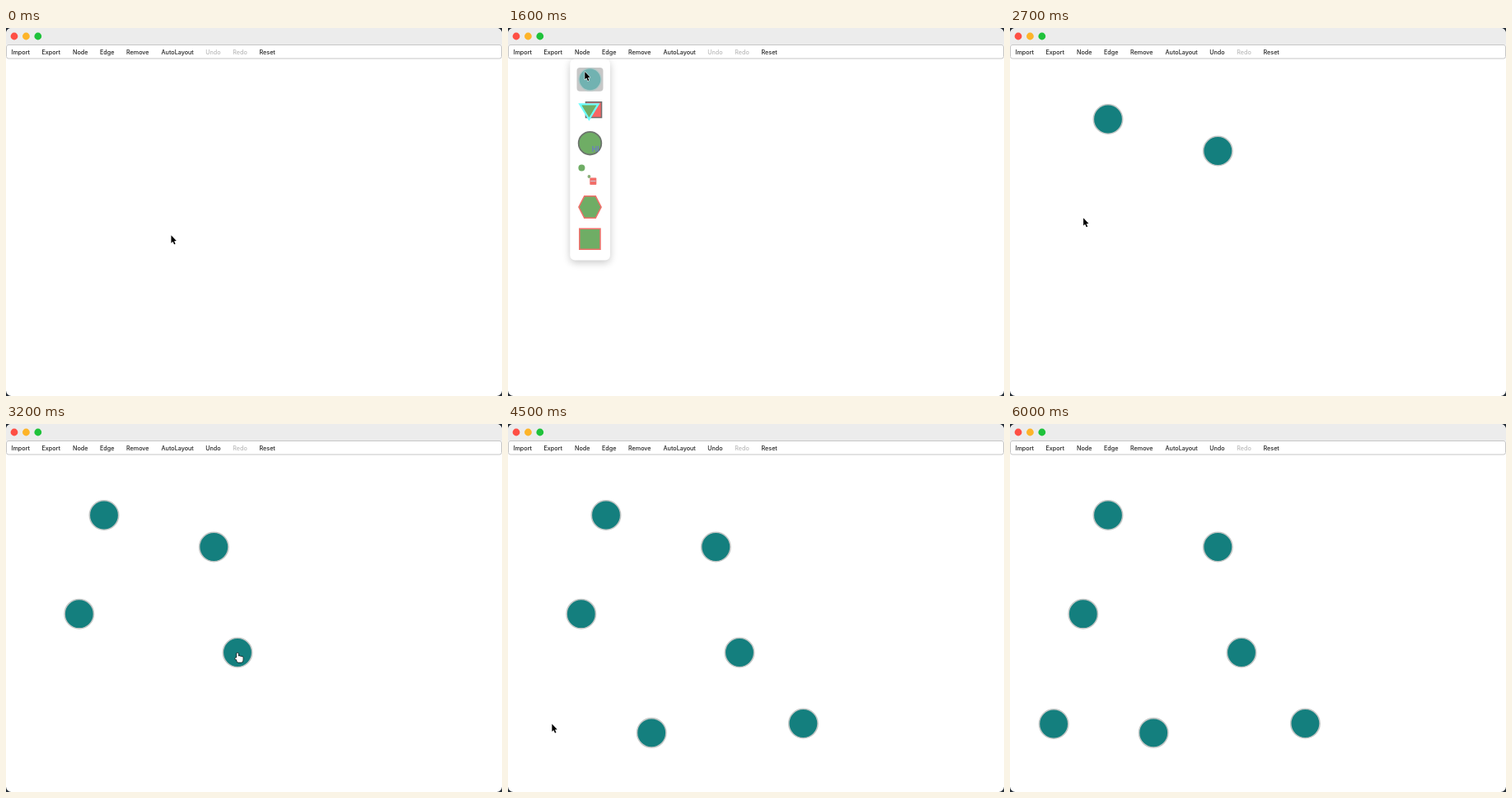
Recreate the animation shown at these times as an HTML page with a canvas. Size 602 by 446 pixels, loop 6700 ms.

```html
<!DOCTYPE html>
<html lang="en">
<head>
<meta charset="utf-8">
<title>Graph editor</title>
<style>
  html, body { margin: 0; width: 100%; height: 100%; overflow: hidden; background: #fff; }
  canvas { display: block; width: 602px; height: 446px; }
</style>
</head>
<body>
<canvas id="stage"></canvas>
<script>
const W = 602, H = 446, LOOP = 6700, TICK = 100, TRAVEL = 300;
const MENU_OPEN = 700, MENU_CLICK = 1600, POINTER_GONE = 6000;
const TEAL = '#147f7e', GREEN = '#107800', RED = '#e81008';
const dpr = window.devicePixelRatio || 1;

function setup(canvas) {
  canvas.width = W * dpr;
  canvas.height = H * dpr;
  const c = canvas.getContext('2d');
  c.scale(dpr, dpr);
  return c;
}
const ctx = setup(document.getElementById('stage'));
const layer = document.createElement('canvas');
const menu = setup(layer);

const labels = {
  Import: 6.5, Export: 43.5, Node: 81, Edge: 114, Remove: 146,
  AutoLayout: 188.5, Undo: 242.2, Redo: 275.2, Reset: 307.5
};

// The pointer visits each stop; a stop with `node` leaves a node there after the wait.
const stop = (x, y, arrive, wait = 0, bow = 0) => ({ x, y, arrive, leave: arrive + wait, bow });
const place = (...args) => ({ ...stop(...args), node: true });
const stops = [
  stop(200.2, 251.3, 0),
  stop(113, 157, 100, 200),
  stop(89.5, 29.8, 600, 300),
  stop(95, 252, 1100),
  stop(93, 53, 1200, 400),
  place(119, 110.5, 1800, 200),
  place(252.3, 149, 2200, 200),
  place(88.8, 230.2, 2700, 100, -68),
  place(281, 277, 3000, 200),
  place(174.2, 374.3, 3500, 200),
  place(358.4, 363, 4000),
  place(53.1, 363.5, 4500, 200),
  stop(88, 380, 4800),
  stop(51, 366, 4900),
  stop(138, 70, 5300),
  stop(340, 9, 5700)
];
const nodes = stops.filter(s => s.node);

function pointerAt(t) {
  const i = stops.findLastIndex((s, n) => n === 0 || t >= stops[n - 1].leave);
  const to = stops[i], from = stops[Math.max(0, i - 1)];
  const start = Math.max(from.leave, to.arrive - TRAVEL);
  const k = Math.min(1, Math.max(0, (t - start) / (to.arrive - start || 1)));
  const e = k * (2 - k);
  return [
    from.x + (to.x - from.x) * e,
    from.y + (to.y - from.y) * e + to.bow * 4 * e * (1 - e)
  ];
}

function paint(c, fill, stroke, width) {
  if (fill) { c.fillStyle = fill; c.fill(); }
  if (stroke) { c.strokeStyle = stroke; c.lineWidth = width; c.stroke(); }
}
function disc(c, x, y, r, ...style) {
  c.beginPath();
  c.arc(x, y, r, 0, 7);
  paint(c, ...style);
}
function box(c, x, y, w, h, r, ...style) {
  c.beginPath();
  c.roundRect(x, y, w, h, r);
  paint(c, ...style);
}
function ngon(c, n, x, y, rx, ry, turn, ...style) {
  c.beginPath();
  for (let i = 0; i < n; i++) {
    const a = turn + i * 2 * Math.PI / n;
    c.lineTo(x + rx * Math.cos(a), y + ry * Math.sin(a));
  }
  c.closePath();
  paint(c, ...style);
}

function drawWindow(t) {
  ctx.fillStyle = '#242c36';
  ctx.fillRect(0, 0, W, H);
  box(ctx, 0, 0, W, H, 6.5, '#fff');
  box(ctx, 0, 0, W, 20.5, [6.5, 6.5, 0, 0], '#ececec');
  ['#fe4f45', '#fdb429', '#1fc23b'].forEach((c, i) => disc(ctx, 10 + i * 14.4, 10, 4.4, c));
  box(ctx, 0.5, 20.5, W - 1, 16.5, 2.5, '#fff', '#c6c6c6', 1);

  const active = t >= MENU_OPEN && t < MENU_CLICK;
  if (active) box(ctx, 75, 21, 30, 16, 3.5, '#999');
  ctx.font = '500 7.2px Inter, sans-serif';
  for (const [text, x] of Object.entries(labels)) {
    const off = text === 'Redo' || text === 'Undo' && t < nodes[0].leave;
    ctx.fillStyle = off ? '#b9b9b9' : active && text === 'Node' ? '#f2f2f2' : '#222';
    ctx.fillText(text, x, 31.5);
  }
}

const MID = 99.5, ROW = 38.7, itemY = i => 62.3 + i * ROW;

function drawItems(c) {
  disc(c, MID, itemY(0), 13.6, TEAL, '#7fa5a3', 1.4);

  box(c, 94.5, 89.7, 19, 18.8, 0, '#f40000', '#111', 1.6);
  ngon(c, 3, 98.4, 98.4, 12.9, 12.2, Math.PI / 2, GREEN, '#1ff', 2.2);

  disc(c, MID, itemY(2), 13.8, GREEN, '#0c1a0c', 1.8);
  c.fillStyle = '#0a1fa8';
  c.font = '600 8.5px Inter, sans-serif';
  c.fillText('HI', 101.8, 150.2);

  disc(c, 89.4, 169.6, 4, GREEN);
  disc(c, 98.4, 180, 1.9, '#3c7a20');
  box(c, 99.3, 181.6, 8, 8.4, 0.8, RED);
  box(c, 100.2, 185, 6.2, 1, 0, '#a9a0b8');

  ngon(c, 6, MID, itemY(4), 13.6, 15.3, 0, GREEN, RED, 1.5);
  box(c, MID - 12.7, itemY(5) - 12.5, 25.2, 25, 0, GREEN, RED, 1.5);
}

function drawMenu(t, y) {
  if (t < MENU_OPEN || t >= MENU_CLICK + 200) return;
  const closing = t >= MENU_CLICK;
  menu.clearRect(0, 0, W, H);
  menu.save();
  menu.shadowColor = 'rgba(0,0,0,.36)';
  menu.shadowBlur = 10 * dpr;
  menu.shadowOffsetY = 3 * dpr;
  box(menu, 75.3, 37.5, 48.7, 244, 6, '#fff');
  menu.restore();
  const hover = closing ? 0 : Math.round((y - itemY(0)) / ROW);
  if (hover >= 0 && y > 45) box(menu, 83.5, itemY(hover) - 14.4, 32, 28.8, 4, '#a3a3a3');
  drawItems(menu);

  ctx.save();
  // keep the soft edge off the menu bar
  ctx.beginPath();
  ctx.rect(0, 37, W, H);
  ctx.clip();
  ctx.globalAlpha = closing ? 0.6 - (t - MENU_CLICK) * 0.0035 : 1;
  ctx.drawImage(layer, 0, 0, W, H);
  ctx.restore();
}

function drawArrow() {
  ctx.scale(0.9, 0.9);
  ctx.lineJoin = 'round';
  ctx.beginPath();
  ctx.moveTo(0.3, 0);
  ctx.lineTo(0.3, 10.4);
  ctx.lineTo(2.6, 8.3);
  ctx.lineTo(4.3, 12.3);
  ctx.lineTo(6, 11.6);
  ctx.lineTo(4.3, 7.7);
  ctx.lineTo(7.4, 7.5);
  ctx.closePath();
  paint(ctx, null, '#fff', 1.2);
  paint(ctx, '#000');
}

function drawHand() {
  ctx.beginPath();
  ctx.roundRect(-1, 0.5, 2, 9, 1);
  for (let i = 0; i < 3; i++) ctx.roundRect(1 + i * 1.8, 4 + i * 0.5, 2, 5, 1);
  ctx.roundRect(-2.8, 6.2, 3.4, 2.4, 1.1);
  ctx.roundRect(-0.8, 7, 7.2, 4.8, 1.8);
  paint(ctx, null, '#111', 1.3);
  paint(ctx, '#fff');
}

function draw(t) {
  const [px, py] = pointerAt(t);
  const shown = nodes.filter(n => t >= n.leave);
  drawWindow(t);
  for (const { x, y } of shown) disc(ctx, x, y, 17.7, TEAL, '#c3c7c6', 1.6);
  drawMenu(t, py);
  if (t >= POINTER_GONE) return;
  ctx.save();
  ctx.translate(px, py);
  if (shown.some(n => Math.hypot(px - n.x, py - n.y) < 18)) drawHand();
  else drawArrow();
  ctx.restore();
}

let origin;
function loop(now) {
  origin ??= now;
  draw(Math.floor(((now - origin) % LOOP) / TICK) * TICK);
  requestAnimationFrame(loop);
}
draw(0);
requestAnimationFrame(loop);
</script>
</body>
</html>
```
